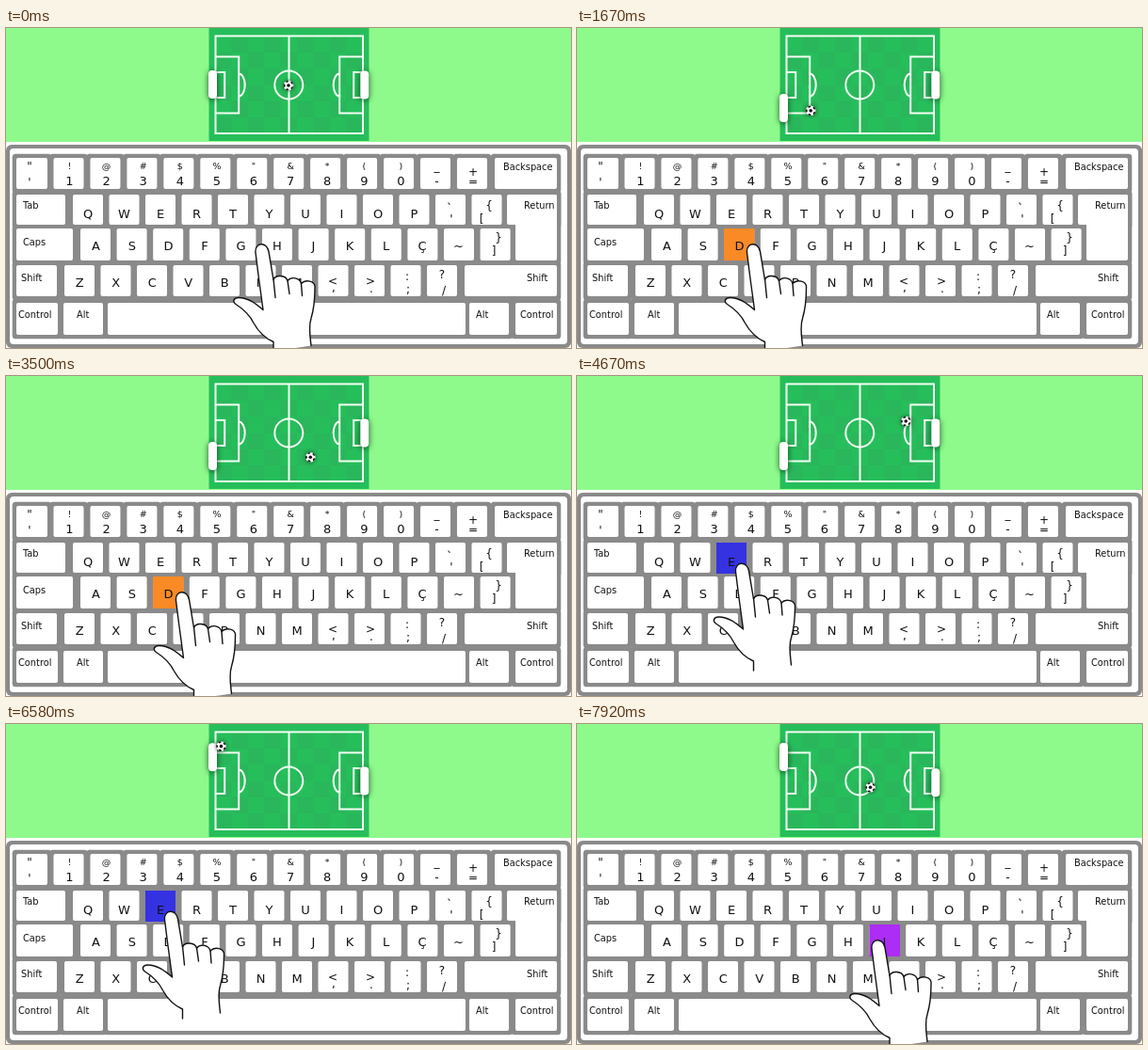
An HTML page with a canvas that plays this animation: 600 px wide and 340 px high, repeating every 8000 ms.

```html
<!DOCTYPE html>
<html lang="en">
<head>
<meta charset="utf-8">
<title>Keyboard football</title>
<style>
html, body { margin: 0; width: 100%; height: 100%; overflow: hidden; background: #fff; }
canvas { display: block; width: 600px; height: 340px; }
</style>
</head>
<body>
<canvas id="stage" width="600" height="340"></canvas>
<script>
const canvas = document.getElementById('stage');
let ctx = canvas.getContext('2d');
const LOOP = 8000, TICK = 1000 / 12;
const GREY = '#8b8a8b', INK = '#111';

const clamp = v => Math.max(0, Math.min(1, v));
const smooth = v => v * v * (3 - 2 * v);
const mix = (a, b, k) => a + (b - a) * k;
const ramp = (t, t0, t1) => clamp((t - t0) / (t1 - t0));

// Reflects a straight run between two walls.
function bounce(v, low, high) {
  const span = high - low;
  const d = (((v - low) % (2 * span)) + 2 * span) % (2 * span);
  return low + (d < span ? d : 2 * span - d);
}

function box(x, y, w, h, r, color) {
  ctx.fillStyle = color;
  ctx.beginPath();
  ctx.roundRect(x, y, w, h, r);
  ctx.fill();
}

function label(text, x, y, size = 13, align = 'center') {
  ctx.font = size + 'px "DejaVu Sans", sans-serif';
  ctx.textAlign = align;
  ctx.fillStyle = INK;
  ctx.fillText(text, x, y);
}

function line(...points) {
  ctx.beginPath();
  points.forEach(([x, y]) => ctx.lineTo(x, y));
  ctx.stroke();
}

// Keyboard rows: top, height, first small key, count and spacing, wide keys as [left, right].
const rows = [
  { y: 138, h: 33, x: 50.5, n: 12, pitch: 38.95, wide: [[11, 44], [519, 585]] },
  { y: 177, h: 32, x: 71, n: 12, pitch: 38.5, wide: [[11, 63]] },
  { y: 213, h: 34, x: 79, n: 12, pitch: 38.6, wide: [[11, 71]] },
  { y: 252, h: 33, x: 62, n: 11, pitch: 38.5, wide: [[11, 54], [487, 585]] },
  { y: 292, h: 34, n: 0, wide: [[11, 55], [61, 103], [108, 488], [492, 534], [541, 585]] }
];

function keyCaps() {
  const caps = [];
  for (const row of rows) {
    for (const [a, b] of row.wide) caps.push([a, row.y, b - a, row.h]);
    for (let i = 0; i < row.n; i++) caps.push([row.x + i * row.pitch, row.y, 32, row.h]);
  }
  caps.push([532, 177, 53, 32], [541, 177, 44, 70]);
  return caps;
}

function drawKeyboard() {
  box(0, 124, 600, 216, 6, GREY);
  box(4, 128, 592, 208, 4, '#fff');
  const caps = keyCaps();
  for (const [x, y, w, h] of caps) box(x - 4.3, y - 4.3, w + 8.6, h + 8.6, 3.5, GREY);
  for (const [x, y, w, h] of caps) box(x, y, w, h, 2, '#fff');
}

function drawLabels() {
  const spread = (text, x, y, pitch, size) =>
    [...text].forEach((c, i) => label(c, x + i * pitch, y, size));
  spread('!@#$%"&*()', 67.5, 150, 39.1, 9.5);
  spread('1234567890', 67.5, 167, 39.1);
  spread('QWERTYUIOP', 87, 202, 38.5);
  spread('ASDFGHJKLÇ~', 95.5, 236, 38.5);
  spread('ZXCVBNM', 78.2, 275, 38.5);

  const extras = [
    ['"', 25, 151], ["'", 25, 168], ['_', 457.5, 151], ['-', 457.5, 167],
    ['+', 496, 157], ['=', 496, 167],
    ['`', 471, 196], ["'", 473, 207], ['{', 513, 192.5], ['[', 505, 206.5],
    ['}', 523, 227], [']', 518, 241], ['<', 347, 273], [',', 348, 280],
    ['>', 387, 273], ['.', 388, 281], [':', 426, 268], [';', 427, 282],
    ['?', 463, 266], ['/', 465, 283]
  ];
  for (const [c, x, y] of extras) label(c, x, y, 12);

  const names = [
    ['Backspace', 528, 151], ['Tab', 18, 192], ['Return', 550, 192],
    ['Caps', 18, 231], ['Shift', 16, 269], ['Shift', 553, 269],
    ['Control', 13, 308], ['Alt', 75, 308], ['Alt', 499, 308], ['Control', 546, 308]
  ];
  for (const [text, x, y] of names) label(text, x, y, 9.8, 'left');
}

function drawPitch() {
  ctx.fillStyle = '#8ffa8c';
  ctx.fillRect(0, 0, 600, 121);
  ctx.fillStyle = '#26be5b';
  ctx.fillRect(215.5, 0, 170, 120);
  ctx.fillStyle = '#2ab65b';
  for (let r = 0; r < 6; r++)
    for (let c = 0; c < 9; c++)
      if ((r + c) % 2) ctx.fillRect(222 + c * 17.4, 9 + r * 17.2, 17.4, 17.2);

  ctx.strokeStyle = '#f4fff4';
  ctx.lineWidth = 2;
  ctx.strokeRect(222.5, 8.5, 156.5, 103.5);
  line([300.5, 8], [300.5, 112]);
  ctx.beginPath();
  ctx.arc(300.3, 60.5, 15, 0, 7);
  ctx.stroke();
  for (const side of [-1, 1]) {
    ctx.save();
    ctx.translate(300.7, 60.5);
    ctx.scale(side, 1);
    line([78, -30], [53.5, -30], [53.5, 30], [78, 30]);
    line([78, -13.5], [68.5, -13.5], [68.5, 13.5], [78, 13.5]);
    ctx.beginPath();
    ctx.ellipse(53.5, 0, 6.5, 12, 0, Math.PI / 2, Math.PI * 1.5);
    ctx.stroke();
    ctx.restore();
  }
}

function drawPaddle(x, y) {
  ctx.save();
  ctx.shadowColor = 'rgba(0,40,10,.8)';
  ctx.shadowBlur = 6;
  ctx.shadowOffsetY = 1;
  box(x - 4.5, y - 15, 9, 30, 4, '#fff');
  ctx.restore();
}

function drawBall(x, y) {
  ctx.save();
  ctx.translate(x, y);
  ctx.shadowColor = 'rgba(0,40,10,.7)';
  ctx.shadowBlur = 4;
  ctx.beginPath();
  ctx.arc(0, 0, 5.3, 0, 7);
  ctx.fillStyle = '#fff';
  ctx.fill();
  ctx.shadowColor = 'transparent';
  ctx.clip();
  ctx.fillStyle = '#151515';
  for (let i = 0; i < 6; i++) {
    const a = i * Math.PI * .4 + .6, d = i ? 5.2 : 0;
    ctx.beginPath();
    ctx.arc(d * Math.cos(a), d * Math.sin(a), 1.8, 0, 7);
    ctx.fill();
  }
  ctx.restore();
}

// Outline relative to the fingertip.
const handShape = new Path2D(`M12 114 L12 104 C3 100 -4 93 -9 84 C-14 74 -20 69 -28 64
  C-32 61 -30 57 -25 57 C-15 57 -7 63 1 70 L-4 33 L-7 9
  C-8 -2 5 -3 7 8 L12 38 C14 32 25 33 27 39 C31 34 40 36 41.5 42
  C46 37 57 39 56 47 C56 62 55 69 52 79 C49 88 51 98 52 108`);
const knuckles = new Path2D('M12 37 L14 57 M27 39 L29 53 M41.5 42 L42.5 55');

function drawHand(x, y) {
  ctx.save();
  ctx.translate(x, y);
  ctx.fillStyle = '#fff';
  ctx.fill(handShape);
  ctx.strokeStyle = INK;
  ctx.lineWidth = 1.4;
  ctx.lineJoin = ctx.lineCap = 'round';
  ctx.stroke(handShape);
  ctx.stroke(knuckles);
  ctx.restore();
}

const presses = [
  { from: 840, to: 1500, tip: [187.5, 229.5], key: [156, 213, 32.5, 34], color: '#f98a26' },
  { from: 3900, to: 4550, tip: [175.5, 199], key: [148, 177, 32, 33], color: '#3532e2' },
  { from: 6700, to: 7450, tip: [320, 229.5], key: [310.5, 213, 32.5, 34], color: '#ad2cf6' }
];

function handTip(t) {
  return presses.reduce((tip, p) => {
    const k = smooth(ramp(t, p.from, p.to));
    return tip.map((v, i) => mix(v, p.tip[i], k));
  }, [272, 229.5]);
}

function layer(paint) {
  const sheet = document.createElement('canvas');
  sheet.width = 600;
  sheet.height = 340;
  const main = ctx;
  ctx = sheet.getContext('2d');
  paint();
  ctx = main;
  return sheet;
}

const board = layer(() => { drawPitch(); drawKeyboard(); });
const letters = layer(drawLabels);

function draw(t) {
  ctx.fillStyle = '#fff';
  ctx.fillRect(0, 0, 600, 340);
  ctx.drawImage(board, 0, 0);

  const leftY = 60 + 25 * ramp(t, 900, 1600) - 50 * ramp(t, 5320, 6590);
  const rightY = 60.5 + .039 * Math.max(0, t - 7870);
  drawPaddle(219.5, leftY);
  drawPaddle(380.8, rightY);

  const run = Math.max(0, t - 845);
  drawBall(bounce(300 - .063 * run, 228, 373), bounce(61 + .0327 * run, 4.5, 117));

  const press = presses.filter(p => t >= p.from).pop();
  if (press) {
    ctx.fillStyle = press.color;
    ctx.fillRect(...press.key);
  }
  ctx.drawImage(letters, 0, 0);
  drawHand(...handTip(t));
}

const start = performance.now();
function frame() {
  const t = (performance.now() - start) % LOOP;
  draw(Math.floor((t + 4) / TICK) * TICK);
  requestAnimationFrame(frame);
}
frame();
</script>
</body>
</html>
```
